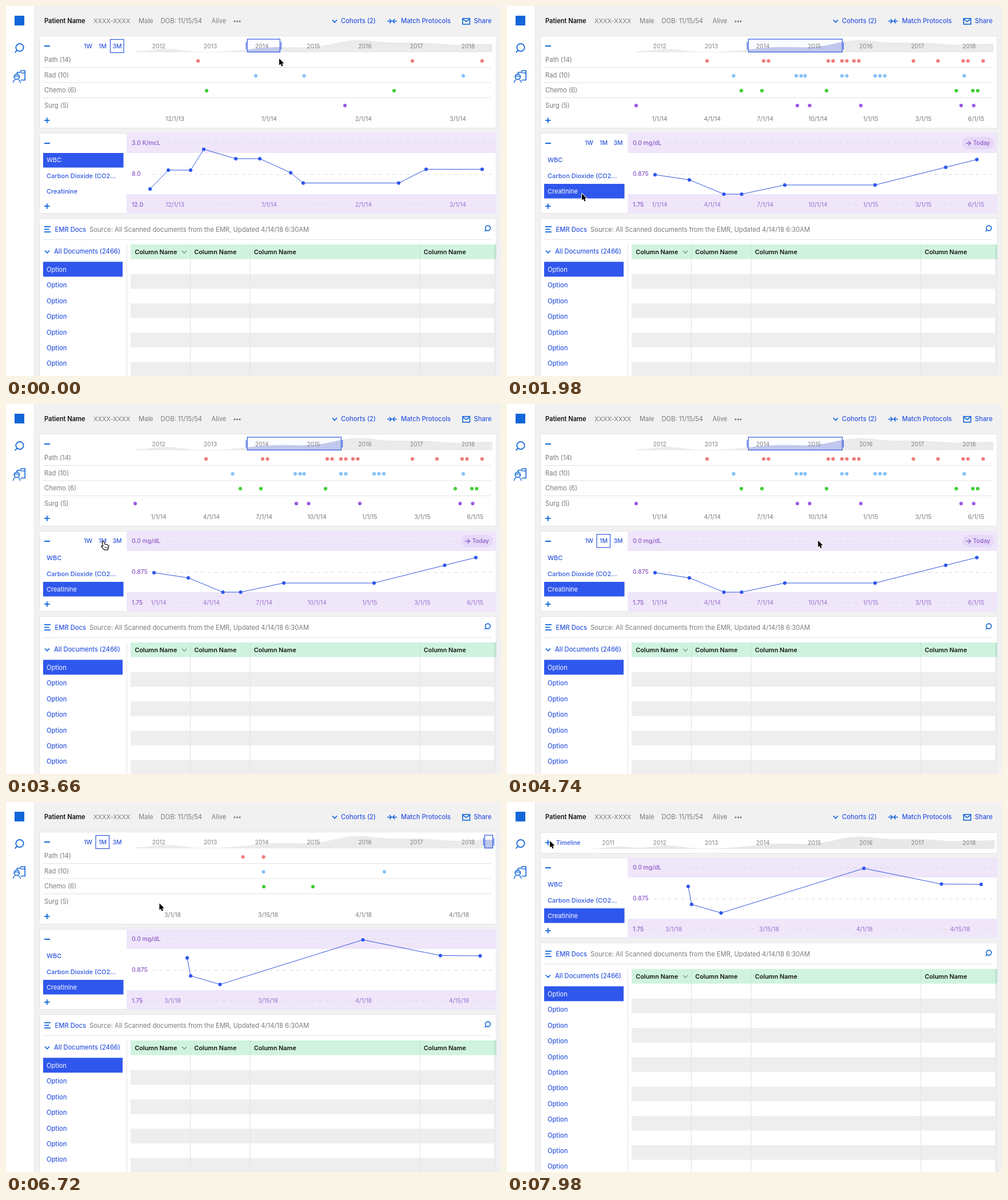
An HTML page with a canvas that plays this animation: 866 by 647 pixels, repeating every 8 s.

```html
<!DOCTYPE html>
<html lang="en">
<head>
<meta charset="utf-8">
<title>Patient dashboard</title>
<style>
  html, body { margin: 0; width: 100%; height: 100%; overflow: hidden; background: #f1f1f2; }
  canvas { display: block; width: 866px; height: 647px; }
</style>
</head>
<body>
<canvas id="stage"></canvas>
<script>
const W = 866, H = 647, LOOP = 8000;
const canvas = document.getElementById('stage');
const ctx = canvas.getContext('2d');
const ratio = window.devicePixelRatio || 1;
canvas.width = W * ratio;
canvas.height = H * ratio;

const BLUE = '#2f57e0', FILL = '#2f57ec', ICON = '#1266d8', GREY = '#7b7b7e';
const PURPLE = '#8a58c6', LILAC = '#9a72cf', BAND = '#efe6fa', RULE = '#e2e2e3';

// Moments of each click or hover change, in ms
const AT = { grab: 240, drop: 660, enterLab: 1440, creatinine: 1920, month: 4080, today: 5280, leaveLab: 6500, collapse: 7560 };

const ROWS = [['Path (14)', '#f17c7c'], ['Rad (10)', '#86c2f8'], ['Chemo (6)', '#40cf33'], ['Surg (5)', '#9a57e4']];

// Each visit in a pair has a follow-up shortly after
const paired = (singles, pairs) => [...singles, ...pairs.flatMap(x => [x, x + 8.5])];

const RANGES = {
  quarter: {
    first: 295.5, step: 165, dates: ['12/1/13', '1/1/14', '2/1/14', '3/1/14'],
    dots: [[336, 711, 833], [437, 521.5, 800], [351, 679], [593]]
  },
  wide: {
    first: 267, step: 92.3, dates: ['1/1/14', '4/1/14', '7/1/14', '10/1/14', '1/1/15', '3/1/15', '6/1/15'],
    dots: [
      paired([350, 711, 754, 833], [449, 562, 586, 607, 798]),
      paired([396.5, 521.5, 661, 800], [506, 586, 644]),
      paired([410, 446, 559, 786], [815]),
      [226, 508, 529.5, 619, 794.5, 816.5]
    ]
  },
  month: {
    first: 291.5, step: 167, dates: ['3/1/18', '3/15/18', '4/1/18', '4/15/18'],
    dots: [[414.5, 450.5], [450.5, 662], [451, 537], []]
  }
};

// Early readings get squeezed to the left when the range widens
const START_X = 252;
const squeeze = ([x, y]) => {
  const d = x - START_X;
  return [START_X + d * .28 + 9 * Math.sin(Math.PI * d / 435), y];
};
const early = [[START_X, 320], [284, 287], [323, 287], [346, 250.5], [402, 267], [444, 267], [498, 291.5],
  [520, 309.5], [687, 309.5], [735, 285.5], [833, 285.5]];
const late = [[432, 273], [450, 285.5], [488, 255.5], [525.5, 295], [568, 284.5], [577, 305.5], [587.5, 276], [623.5, 289],
  [640, 275], [656, 284.5], [691, 284.5], [712.5, 240], [734, 246], [755, 267], [785.5, 292.5], [833, 292.5], [844, 285]];

const SERIES = {
  wbcQuarter: early,
  wbcWide: [...early.map(squeeze), ...late],
  creatWide: [[259, 295], [319, 304], [379.5, 329], [410.5, 329], [486, 313], [644, 313], [767.5, 282], [822, 268.5]],
  creatMonth: [[317, 272.5], [323, 304], [374.5, 319], [624.5, 241], [760, 268.5], [829.5, 269]]
};

const STOPS = [
  { x: 478, y: 92, arrive: 0, leave: 0 },
  { x: 481, y: 74, arrive: AT.grab, leave: AT.grab },
  { x: 588, y: 74, arrive: AT.drop, leave: 780 },
  { x: 251, y: 249, arrive: 1340, leave: 1440, hand: true },
  { x: 131, y: 328, arrive: 1800, leave: 2880 },
  { x: 170, y: 240, arrive: 3480, leave: 4300, hand: true },
  { x: 819, y: 238, arrive: 5100, leave: 5380, hand: true },
  { x: 507, y: 312, arrive: 5940, leave: 5940 },
  { x: 75, y: 68, arrive: 7400, leave: AT.collapse, hand: true }
];

const clamp = u => Math.min(1, Math.max(0, u));
const ease = u => u * u * (3 - 2 * u);
const mix = (a, b, u) => a + (b - a) * u;

function text(s, x, y, color, size = 11.2, weight = 400, align = 'left') {
  ctx.font = `${weight} ${size}px Inter, Roboto, sans-serif`;
  ctx.fillStyle = color;
  ctx.textAlign = align;
  ctx.fillText(s, x, y + size * 0.36);
}

function rect(x, y, w, h, color) {
  ctx.fillStyle = color;
  ctx.fillRect(x, y, w, h);
}

function frame(x, y, w, h, color, width = 1) {
  ctx.strokeStyle = color;
  ctx.lineWidth = width;
  ctx.strokeRect(x, y, w, h);
}

function line(points, color, width = 1) {
  ctx.beginPath();
  points.forEach(([x, y]) => ctx.lineTo(x, y));
  ctx.strokeStyle = color;
  ctx.lineWidth = width;
  ctx.stroke();
}

function dot(x, y, r, color) {
  ctx.beginPath();
  ctx.arc(x, y, r, 0, Math.PI * 2);
  ctx.fillStyle = color;
  ctx.fill();
}

function ring(x, y, r, color, width) {
  ctx.beginPath();
  ctx.arc(x, y, r, 0, Math.PI * 2);
  ctx.strokeStyle = color;
  ctx.lineWidth = width;
  ctx.stroke();
}

function panel(y, h) {
  rect(58, y, 800, h, '#fff');
  frame(58.5, y + .5, 799, h - 1, '#e5e5e6');
}

function minus(y) { rect(67, y - 1, 10, 2, ICON); }

function plus(y) {
  rect(67, y - .9, 9.5, 1.8, ICON);
  rect(70.9, y - 4.7, 1.8, 9.5, ICON);
}

function chevron(x, y, color, width) {
  line([[x - 4, y - 2], [x, y + 2.3], [x + 4, y - 2]], color, width);
}

function magnifier(x, y, r, width) {
  const d = r * .7;
  ring(x, y, r, ICON, width);
  line([[x - d, y + d], [x - d * 1.75, y + d * 1.9]], ICON, width);
}

function zoomButtons(y, active) {
  ['1W', '1M', '3M'].forEach((name, i) => {
    const x = 143.5 + i * 25.5;
    text(name, x, y, BLUE, 10.4, 500, 'center');
    if (name === active) frame(x - 12, y - 11.5, 23.5, 23, BLUE, 1.2);
  });
}

function sidebar() {
  rect(0, 0, 49, H, '#fff');
  rect(49, 0, 1, H, '#e6e6e7');
  rect(15, 17, 17, 17, ICON);
  magnifier(24, 72.5, 6.7, 1.8);
  line([[19.5, 119], [19.5, 116], [25, 116], [26.5, 113], [33.2, 113], [33.2, 129.5], [26, 129.5]], ICON, 1.6);
  line([[26, 117], [33, 117]], ICON, 1.4);
  ring(18.8, 123.7, 4.6, ICON, 1.6);
  line([[14.5, 123], [19, 122], [23, 124]], ICON, 1.3);
  ctx.beginPath();
  ctx.arc(18.8, 134.5, 6.3, Math.PI, Math.PI * 1.35);
  ctx.moveTo(25.1, 134.5);
  ctx.arc(18.8, 134.5, 6.3, 0, -Math.PI * .35, true);
  ctx.stroke();
}

function header() {
  text('Patient Name', 67, 26, '#111', 11.1, 600);
  text('XXXX-XXXX', 153, 26, GREY, 11);
  text('Male', 232, 26, GREY);
  text('DOB: 11/15/54', 270.5, 26, GREY);
  text('Alive', 359.5, 26, GREY);
  for (let i = 0; i < 3; i++) dot(400 + i * 4.5, 27, 1.4, '#666');
  chevron(575, 26.3, ICON, 1.7);
  text('Cohorts (2)', 586, 26, BLUE, 11.2, 500);
  for (const [x, d] of [[667, 1], [684, -1]]) {
    line([[x, 26.5], [x + 7 * d, 26.5]], ICON, 1.6);
    line([[x + 3.8 * d, 22.8], [x + 7.4 * d, 26.5], [x + 3.8 * d, 30.2]], ICON, 1.6);
  }
  text('Match Protocols', 691, 26, BLUE, 11.2, 500);
  frame(798.8, 21.8, 12.6, 10, ICON, 1.6);
  line([[799, 22.8], [805.1, 27.2], [811.2, 22.8]], ICON, 1.6);
  text('Share', 818.5, 26, BLUE, 11.2, 500);
}

function waveHeight(x) {
  const bump = (center, width, height) => height * Math.exp(-(((x - center) / width) ** 2));
  return bump(195, 30, 4) + bump(280, 38, 6) + bump(480, 75, 9) + bump(610, 60, 19) + bump(720, 75, 16) + bump(850, 70, 14);
}

function wave(left, right, color) {
  ctx.beginPath();
  ctx.moveTo(left, 81);
  for (let x = left; x < right; x += 2) ctx.lineTo(x, 81 - waveHeight(x));
  ctx.lineTo(right, 81 - waveHeight(right));
  ctx.lineTo(right, 81);
  ctx.fillStyle = color;
  ctx.fill();
}

function years(first) {
  for (let year = first; year <= 2018; year++) {
    text(String(year), 177 + (year - 2011) * 90.2, 70, '#858587', 10.4, 400, 'center');
  }
}

function selection(left, right) {
  rect(left, 58, right - left, 23, 'rgba(70,100,235,.02)');
  wave(left, right, 'rgba(60,90,235,.23)');
  frame(left, 58, right - left, 22.5, BLUE, 1.2);
  rect(left - 2.6, 63, 1.2, 13, BLUE);
  rect(right + 1.4, 63, 1.2, 13, BLUE);
}

function timeline(s) {
  panel(52, 162);
  minus(70);
  if (s.topZoom) zoomButtons(70, s.topActive);
  wave(227, 851, '#ebebec');
  selection(s.left, s.right);
  years(2012);
  ROWS.forEach(([name, color], i) => {
    text(name, 67, 94 + i * 26.5, GREY);
    if (i < 3) rect(65, 107 + i * 26.5, 784, 1, RULE);
    s.range.dots[i].forEach(x => dot(x, 96 + i * 26, 3.1, color));
  });
  plus(200);
  ticks(s.range, 197, GREY);
}

function ticks({ first, step, dates }, y, color, back) {
  dates.forEach((date, i) => {
    const x = first + i * step;
    if (back) rect(x - 23, y - 6, 46, 12, back);
    text(date, x, y, color, 10.4, 400, 'center');
  });
}

function collapsedTimeline() {
  panel(53, 37);
  plus(71);
  text('Timeline', 86, 71, BLUE, 10.4, 500);
  ctx.save();
  ctx.translate(0, 1);
  wave(150, 853, '#e8e8e9');
  years(2011);
  ctx.restore();
}

function dashes(from, y) {
  ctx.setLineDash([5, 7]);
  line([[from, y], [857, y]], '#dbd6df');
  ctx.setLineDash([]);
}

function todayPill() {
  ctx.beginPath();
  ctx.roundRect(796.5, 229, 55.5, 21.5, 10.7);
  ctx.fillStyle = '#e6d9f8';
  ctx.fill();
  line([[803, 240], [811, 240]], PURPLE, 1.3);
  line([[807.5, 236.3], [811.3, 240], [807.5, 243.7]], PURPLE, 1.3);
  text('Today', 815.5, 239.7, PURPLE, 10.1, 500);
}

function labs(s) {
  panel(222, 141);
  minus(240);
  plus(350);
  if (s.labZoom) zoomButtons(239.5, s.labActive);
  ['WBC', 'Carbon Dioxide (CO2...', 'Creatinine'].forEach((name, i) => {
    const on = i === (s.creatinine ? 2 : 0), y = 269.5 + i * 27.2;
    if (on) rect(65, Math.round(y - 12.9), 140.5, 25.5, FILL);
    text(name, 71, y, on ? '#fff' : BLUE, 11, on ? 400 : 500);
  });

  rect(211, 222, 647, 35, BAND);
  rect(211, 329, 647, 34, BAND);
  dashes(281, 239.5);
  dashes(257, 294.5);
  dashes(247, 347.5);
  const scale = s.creatinine ? ['0.0 mg/dL', '0.875', '1.75'] : ['3.0 K/mcL', '8.0', '12.0'];
  scale.forEach((label, i) => text(label, 220, 239.5 + i * 54, PURPLE, 10.3, 500));
  ticks(s.range, 347.5, LILAC, BAND);

  if (s.today) todayPill();
  line(s.series, BLUE, 1);
  s.series.forEach(([x, y]) => dot(x, y, 3.1, FILL));
}

function documents() {
  panel(371, 420);
  for (let i = 0; i < 3; i++) rect(67, 385 + i * 4.6, i === 1 ? 8.5 : 11, 1.8, ICON);
  text('EMR Docs', 85.5, 391, BLUE, 11.2, 500);
  text('Source: All Scanned documents from the EMR, Updated 4/14/18 6:30AM', 146, 391, GREY, 11.25);
  magnifier(843, 388.5, 4.4, 1.6);
  rect(65, 408, 784, 1, RULE);
  chevron(72, 429.5, ICON, 1.8);
  text('All Documents (2466)', 84, 429.5, BLUE, 11.1, 500);
  rect(211, 417, 1, 360, RULE);
  rect(65, 447.3, 139, 26, FILL);
  for (let i = 0; i < 12; i++) text('Option', 71, 461 + i * 27.4, i ? BLUE : '#fff', 11.1, i ? 500 : 400);

  rect(218, 417, 640, 25.6, '#cff3df');
  rect(854, 417, 3.5, 25.6, '#bce5cf');
  for (let y = 469; y < 780; y += 51.2) rect(218, y, 636, 25.6, '#eeeeef');
  rect(854, 443, 3.5, 340, '#ececed');
  for (const x of [218, 322, 426.5, 723.5]) {
    if (x > 218) {
      rect(x, 417, 1, 25.6, '#c3e3d0');
      rect(x, 443, 1, 340, '#e1e1e2');
    }
    text('Column Name', x + 7.2, 430, '#151515', 10.9, 600);
  }
  chevron(312, 430, '#7d9287', 1.3);
}

function shape(points) {
  ctx.beginPath();
  points.forEach(([x, y]) => ctx.lineTo(x, y));
  ctx.closePath();
}

function hand() {
  shape([[-2, 1], [0, 0], [1.8, 1.5], [3.2, 5.5], [6.6, 5.7], [10, 8], [8.3, 15.2], [2, 15.2], [-3.4, 9.2], [-3, 7.7], [-.2, 8.8]]);
  ctx.fillStyle = '#fff';
  ctx.fill();
  ctx.strokeStyle = '#111';
  ctx.lineWidth = 1.2;
  ctx.stroke();
  for (let x = 3; x < 8; x += 2.1) line([[x, 9.5], [x + .3, 12.6]], '#111', .8);
}

function arrow() {
  shape([[0, 0], [0, 11.6], [2.6, 9.2], [4.4, 13.4], [6.5, 12.5], [4.8, 8.4], [8.3, 8.2]]);
  ctx.strokeStyle = '#fff';
  ctx.lineWidth = 2;
  ctx.stroke();
  ctx.fillStyle = '#000';
  ctx.fill();
}

function cursor(t) {
  const i = STOPS.findLastIndex(stop => stop.arrive <= t);
  const a = STOPS[i], b = STOPS[i + 1] || a;
  const u = a === b ? 0 : ease(clamp((t - a.leave) / (b.arrive - a.leave)));
  const pointing = (a.hand && t < a.leave) || (b !== a && b.hand && u > .98);
  ctx.save();
  ctx.translate(mix(a.x, b.x, u), mix(a.y, b.y, u));
  ctx.lineJoin = 'round';
  if (pointing) hand();
  else arrow();
  ctx.restore();
}

function stateAt(t) {
  const drag = ease(clamp((t - AT.grab) / (AT.drop - AT.grab)));
  const ended = t >= AT.today, creatinine = t >= AT.creatinine, wide = t >= AT.drop;
  const hovering = t >= AT.enterLab && t < AT.leaveLab;
  return {
    creatinine,
    range: RANGES[ended ? 'month' : wide ? 'wide' : 'quarter'],
    series: SERIES[ended ? 'creatMonth' : creatinine ? 'creatWide' : wide ? 'wbcWide' : 'wbcQuarter'],
    left: ended ? 837.5 : 422.3,
    right: ended ? 851.5 : mix(479.3, 586.5, drag),
    topZoom: !hovering,
    topActive: t < AT.grab ? '3M' : ended ? '1M' : '',
    labZoom: hovering,
    labActive: t >= AT.month ? '1M' : '',
    today: hovering && !ended,
    collapsed: t >= AT.collapse
  };
}

function draw(t) {
  const s = stateAt(t);
  ctx.setTransform(ratio, 0, 0, ratio, 0, 0);
  rect(0, 0, W, H, '#f1f1f2');
  sidebar();
  header();
  if (s.collapsed) collapsedTimeline();
  else timeline(s);
  ctx.save();
  if (s.collapsed) ctx.translate(0, -125);
  labs(s);
  documents();
  ctx.restore();
  cursor(t);
}

const start = performance.now();
function tick() {
  draw((performance.now() - start) % LOOP);
  requestAnimationFrame(tick);
}
tick();
</script>
</body>
</html>
```
